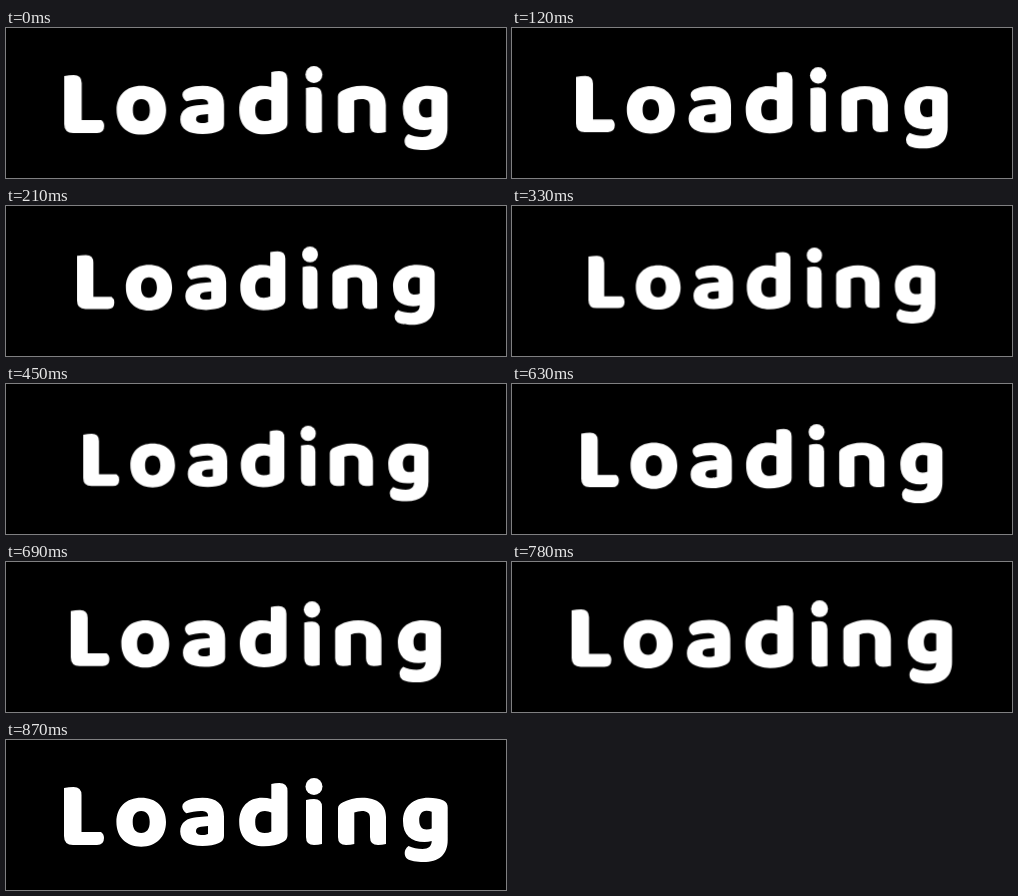
These frames come from a looping animation (500x150 px, 900 ms). An HTML page:

```html
<!DOCTYPE html>
<html lang="en">
<head>
<meta charset="utf-8">
<title>Loading</title>
<style>
  html, body {
    margin: 0;
    width: 100%;
    height: 100%;
    overflow: hidden;
    background: #000;
  }
  svg {
    display: block;
    width: 500px;
    height: 150px;
  }
  .word {
    fill: #fff;
    fill-rule: evenodd;
    transform-origin: 250px 75px;
    animation: breathe 900ms -30ms infinite;
  }
  @keyframes breathe {
    0% { transform: scale(1); animation-timing-function: cubic-bezier(.38, 0, .45, 1); }
    50% { transform: scale(.899); animation-timing-function: cubic-bezier(.45, 0, .59, 1); }
    100% { transform: scale(1); }
  }
</style>
</head>
<body>
<svg viewBox="0 0 500 150" role="img" aria-label="Loading">
  <g class="word">
    <!-- L -->
    <path d="M58 48Q63 47 67.5 47Q75.5 47 75.5 55V92H95Q98 94 98 98Q98 105 91 105H67Q58 105 58 96Z"/>
    <!-- o -->
    <path d="M135.2 57.7C150 57.7 160 67 160 82C160 97 150 106.7 135.2 106.7C120.4 106.7 110.4 97 110.4 82C110.4 67 120.4 57.7 135.2 57.7Z
             M135.2 71C129.7 71 126.7 75 126.7 82C126.7 89 129.7 93 135.2 93C140.7 93 143.7 89 143.7 82C143.7 75 140.7 71 135.2 71Z"/>
    <!-- a -->
    <path d="M180.3 73.3Q176.3 70.3 176.3 66.5C176.3 60.7 186.5 57.7 196.5 57.7C211 57.7 218 64.5 218 76.5V96Q218 101 213 103C209 105 203 106 196.5 106C182.3 106 174.2 101 174.2 91.5C174.2 82 181.5 78 190.5 77.2L202 76.2V75.3C202 72.3 199 71 195 71C190 71 184.5 72.3 180.3 73.3Z
             M202 86L195 86.7C192 87 190 88.5 190 91C190 93.5 192 95 196.5 95C199 95 201 94.5 202 94Z"/>
    <!-- d -->
    <path d="M265.3 44Q269 43 273.3 43Q281.5 43 281.5 51V95Q281.5 100 277 102C272 105 265 106.3 258 106.3C243 106.3 233.2 98 233.2 82C233.2 66.5 243 57.7 256 57.7Q261.5 57.7 265.3 59Z
             M265.3 72.5Q262.5 71 259 71C252.5 71 249.2 75 249.2 82C249.2 89.5 252.5 93 258.5 93Q262.5 93 265.3 91.5Z"/>
    <!-- i -->
    <circle cx="308" cy="46.5" r="8.5"/>
    <path d="M300 60Q304 59 308 59Q316 59 316 67V104Q312 105 308 105Q300 105 300 97Z"/>
    <!-- n -->
    <path d="M332 68.5Q332 64.5 337 62.3C342 59.5 349 57.7 356 57.7C371 57.7 380 64.5 380 77V104Q376 105 372 105Q364 105 364 97V78C364 73 361 71 356 71Q352 71 348.3 72.5V104Q345 105 340 105Q332 105 332 97Z"/>
    <!-- g -->
    <path d="M397 81C397 66.5 407.5 57.7 422.5 57.7Q431.5 57.7 437.5 60.5Q441.7 62.5 441.7 67.5V100C441.7 115 432.5 122 417.5 122C410.5 122 404.5 121 401.5 119Q398.7 117 398.7 113Q398.7 109 402.5 106C406.5 108 411.5 109 416.5 109C422.5 109 425.7 106 425.7 101Q422.5 102 418.5 102C405 102 397 95 397 81Z
             M425.7 71.7Q423.5 70.7 420.5 70.7C415.5 70.7 413.2 75 413.2 80C413.2 86.5 416 89.5 420.5 89.5Q423.5 89.5 425.7 88.5Z"/>
  </g>
</svg>
</body>
</html>
```
